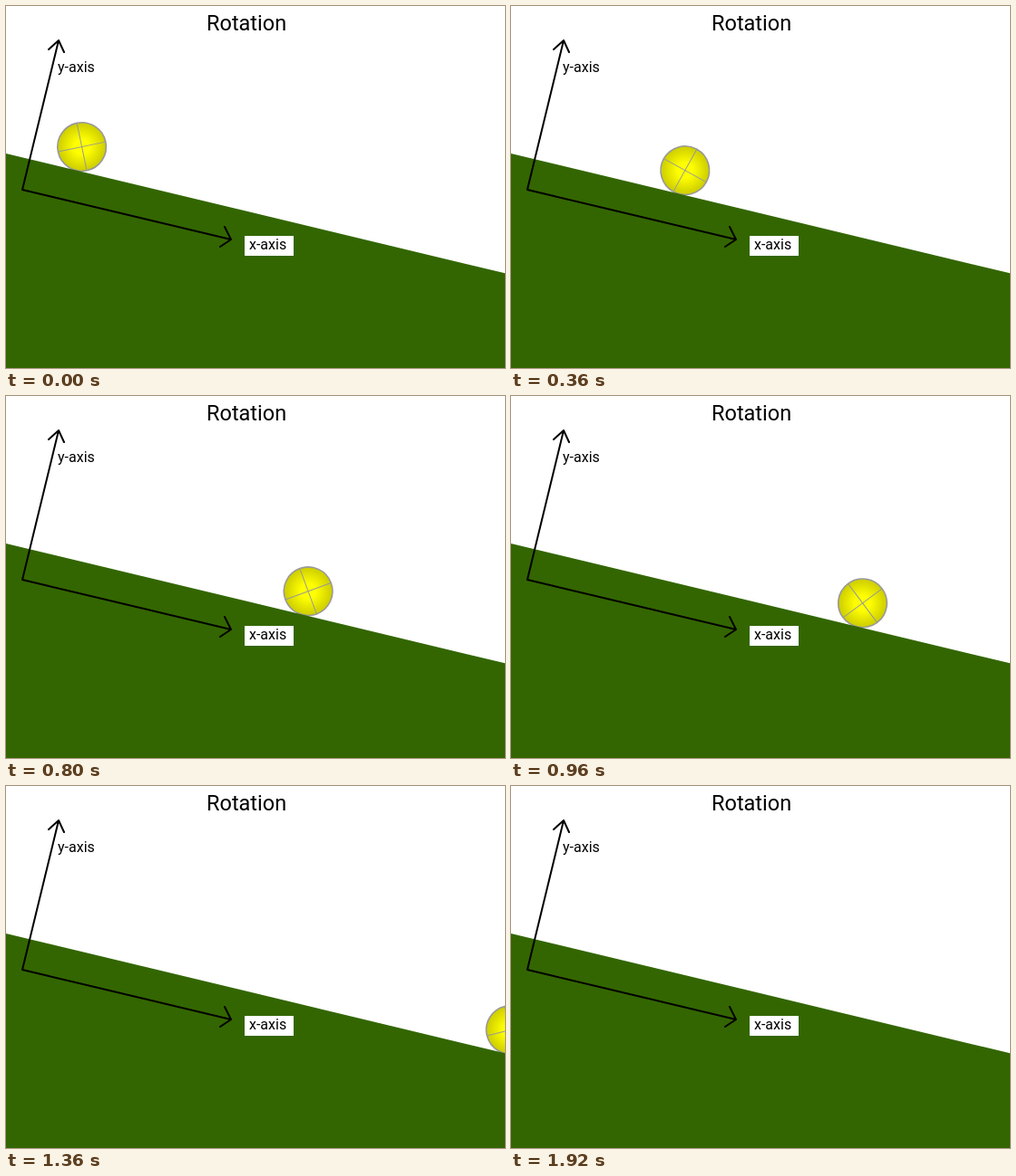
Animation of 550 by 400 pixels, one loop 2000 ms. Source, as an HTML page:

```html
<!DOCTYPE html>
<html lang="en">
<head>
<meta charset="utf-8">
<title>Rotation</title>
<style>
  html, body { margin: 0; width: 100%; height: 100%; overflow: hidden; background: #fff; }
  svg { display: block; width: 550px; height: 400px; }
  text { font: 16px Roboto, "Open Sans", sans-serif; }
  .title { font-size: 23.5px; }
  .axis { fill: none; stroke: #000; stroke-width: 2; stroke-linecap: round; stroke-linejoin: round; }
</style>
</head>
<body>
<svg viewBox="0 0 550 400">
  <defs>
    <radialGradient id="shade">
      <stop offset="0" stop-color="#ff0"/>
      <stop offset=".3" stop-color="#ff0"/>
      <stop offset="1" stop-color="#cc0"/>
    </radialGradient>
  </defs>
  <g id="ball" stroke="#999">
    <circle r="26.8" fill="url(#shade)" stroke-width="1.6"/>
    <path d="M-26.8 0H26.8M0 -26.8V26.8"/>
  </g>
  <path d="M0 163L550 295.3V400H0Z" fill="#360"/>
  <path class="axis" d="M58 38L18 203L248 258M47 48L58 38L64 51M241 244L248 258L236 266"/>
  <rect x="263" y="254" width="54" height="22" fill="#fff"/>
  <text class="title" x="221" y="27">Rotation</text>
  <text x="57" y="73">y-axis</text>
  <text x="268" y="269">x-axis</text>
</svg>
<script>
const LOOP = 2000;
const GONE = 1920;
const LAST_TICK = 40;
const START = { x: 83.6, y: 155.6, angle: -11.8 };
const SLOPE = 0.241;
const SPIN = 18.4; // degrees per tick

// The picture is refreshed only at these moments (ms)
const refreshes = [0, 160, 240, 360, 440, 600, 680, 800, 960, 1160, 1240, 1360, 1560, GONE];
const ball = document.getElementById("ball");

// The ball starts two ticks ahead of the clock and stops past the right edge
const tickAt = ms => ms ? Math.min(LAST_TICK, Math.round(2.1 + 0.027 * ms)) : 0;

// Steady acceleration down the slope, steady spin
function draw(now) {
  const time = now % LOOP;
  const shown = refreshes.findLast(ms => ms <= time);
  const tick = tickAt(shown);
  const distance = 7.64 * tick + 0.1148 * tick ** 2;
  const x = START.x + distance;
  const y = START.y + SLOPE * distance;
  const angle = START.angle + SPIN * tick;
  ball.setAttribute("transform", `translate(${x} ${y}) rotate(${angle})`);
  ball.setAttribute("visibility", shown === GONE ? "hidden" : "visible");
}

function animate() {
  draw(performance.now());
  requestAnimationFrame(animate);
}
animate();
</script>
</body>
</html>
```
